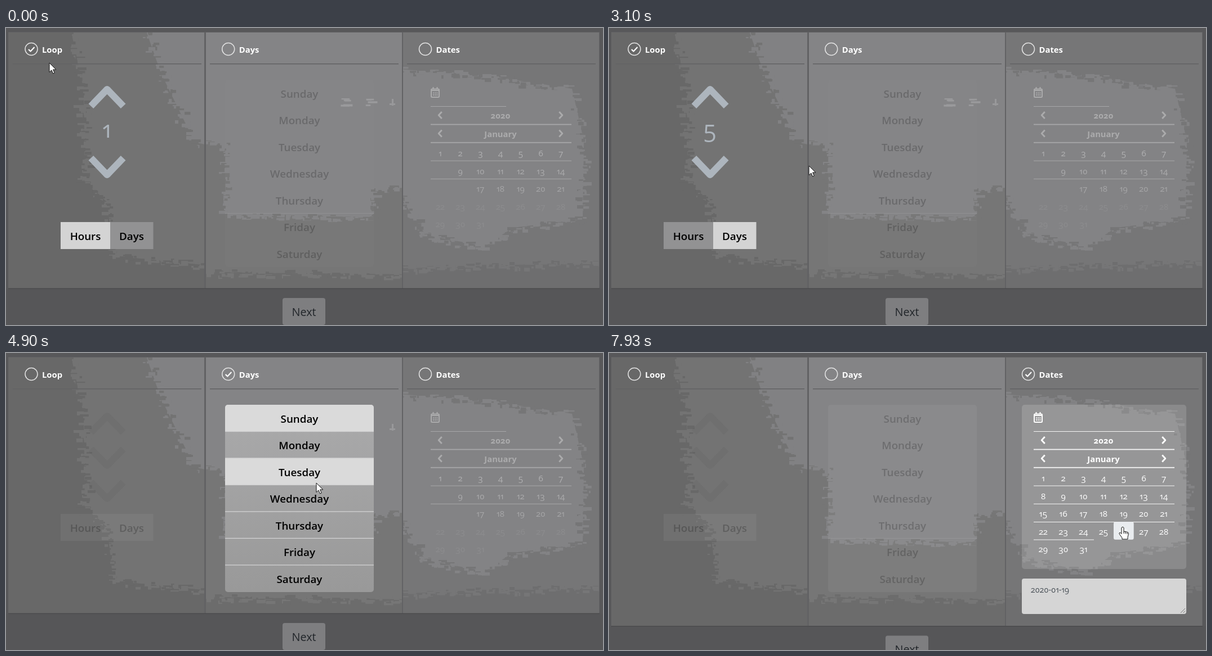
These frames come from a looping animation (1060x528 px, 8 s). An HTML page with a canvas:

```html
<!DOCTYPE html>
<html lang="en">
<head>
<meta charset="utf-8">
<title>Schedule picker</title>
<style>
  html, body { margin: 0; width: 100%; height: 100%; overflow: hidden; background: #565658; }
  canvas, svg { position: absolute; left: 0; top: 0; width: 1060px; height: 528px; }
  svg { font-family: "Open Sans", "Noto Sans", sans-serif; font-variant-numeric: oldstyle-nums; }
  text { text-anchor: middle; }
  polyline { fill: none; stroke-linejoin: round; }
  .left { text-anchor: start; }
</style>
</head>
<body>
<canvas id="back" width="1060" height="528"></canvas>
<svg id="stage" viewBox="0 0 1060 528"></svg>
<script>
const LOOP = 8000;
const TICK = 77.75;   // the screen refreshes once per tick
const LEAD = 16;

// Pointer stops: tick of arrival, x, y, ticks of rest. Every rest ends in a click.
const STOPS = [
  [0, 77, 62, 0], [5, 47, 41, 2], [13, 191, 112, 0], [16, 191, 120, 7],
  [28, 125, 250, 0], [32, 228, 370, 2], [40, 355, 245, 0], [45, 396, 41, 2],
  [54, 581, 116.5, 2], [63, 551, 231, 0], [72, 548, 142, 0], [75, 546, 131.5, 4],
  [85, 741, 40, 3], [96, 912, 286.5, 4], [102, 912, 309, 0]
].map(([at, x, y, rest]) => ({ at, x, y, rest, leave: at + rest }));

const DAYS = ["Sunday", "Monday", "Tuesday", "Wednesday", "Thursday", "Friday", "Saturday"];
const TABS = ["Loop", "Days", "Dates"];

/* ---------- geometry ---------- */
const range = n => [...Array(n).keys()];
const tabX = i => 45 + i * 349.75;
const rowY = i => 92 + i * 47.5;
const cellX = c => 753.2 + c * 35.7;
const cellY = r => 205.5 + r * 31.6;
const within = (p, x, y, w, h) => p.x >= x && p.x < x + w && p.y >= y && p.y < y + h;

const tabAt = p => range(3).findIndex(i => Math.hypot(p.x - tabX(i), p.y - 37.5) < 12);
const rowAt = p => DAYS.findIndex((_, i) => within(p, 389, rowY(i), 264, 47.5));
const dateAt = p => range(31).findIndex(i => within(p, cellX(i % 7), cellY(Math.floor(i / 7)), 35.7, 31.6));
const onUnit = p => within(p, 185, 345, 76.5, 48);

/* ---------- backdrop ---------- */
let seed = 11;
const rnd = () => (seed = (seed * 16807) % 2147483647) / 2147483647;
const ctx = document.getElementById("back").getContext("2d");

function fill(color, x, y, w, h) {
  ctx.fillStyle = color;
  ctx.fillRect(x, y, w, h);
}

// A polygon whose edges break up into short flat dashes
function patch(color, outer, rough, points) {
  ctx.fillStyle = color;
  ctx.beginPath();
  points.forEach(p => ctx.lineTo(p[0], p[1]));
  ctx.fill();
  points.forEach(([x, y], i) => {
    const [u, v] = points[(i + 1) % points.length];
    const n = Math.hypot(u - x, v - y) / 3;
    for (let k = 0; k < n; k++) {
      const off = (rnd() + rnd() - 1) * rough;
      const w = 3 + rnd() * 14, h = 2 + rnd() * 5;
      fill(rnd() < 0.5 ? color : outer,
        Math.round(x + (u - x) * k / n + off - w / 2),
        Math.round(y + (v - y) * k / n + (rnd() - 0.5) * rough), w, h);
    }
  });
}

function panel(x, base, draw) {
  ctx.save();
  ctx.beginPath();
  ctx.rect(x, 8, 348, 478);
  ctx.clip();
  fill(base, x, 8, 348, 478);
  draw();
  ctx.restore();
}

function paintBack() {
  fill("#58585a", 0, 0, 1060, 528);
  fill("#626264", 4, 7, 1050, 479);
  panel(4, "#737373", () => {
    patch("#686868", "#737373", 13, [[-30, -20], [110, -20], [138, 110], [140, 275],
      [180, 310], [190, 405], [390, 425], [390, 520], [-30, 520]]);
    patch("#818183", "#737373", 13, [[240, -20], [275, 80], [335, 203], [390, 215], [390, -20]]);
  });
  panel(355, "#848486", () => {
    patch("#767676", "#848486", 8, [[320, 202], [389, 204], [390, 333], [653, 336],
      [656, 290], [740, 275], [740, 520], [320, 520]]);
    patch("#6c6c6c", "#767676", 12, [[320, 434], [740, 438], [740, 520], [320, 520]]);
  });
  panel(705, "#767677", () => {
    patch("#838385", "#767677", 12, [[680, 72], [850, 84], [1005, 108], [1026, 200],
      [1024, 340], [900, 355], [850, 388], [745, 368], [680, 270]]);
    patch("#6e6e6f", "#767677", 12, [[680, 428], [1090, 415], [1090, 520], [680, 520]]);
  });
  range(3).forEach(i => fill("#626264", 12 + i * 350, 63, 335, 1.5));
}

/* ---------- markup ---------- */
const text = (x, y, size, weight, color, str, more = "") =>
  `<text x="${x}" y="${y}" font-size="${size}" font-weight="${weight}" fill="${color}" ${more}>${str}</text>`;
const rect = (x, y, w, h, color, more = "") =>
  `<rect x="${x}" y="${y}" width="${w}" height="${h}" fill="${color}" ${more}/>`;
const line = (pts, color, width, more = "") =>
  `<polyline points="${pts}" stroke="${color}" stroke-width="${width}" ${more}/>`;
const group = (id, body, more = "") => `<g id="${id}" ${more}>${body}</g>`;

function tab(label, i) {
  const x = tabX(i);
  return `<circle id="ring${i}" cx="${x}" cy="37.5" r="11" fill="none" stroke="#e2e2e2"/>` +
    line(`${x - 5},38 ${x - 1.5},41.5 ${x + 5.5},34`, "#fff", 2.2, `id="check${i}"`) +
    text(x + 19, 43.5, 14.8, 700, "#fff", label, 'class="left"');
}

// Big arrow with its tip at y, opening by d
const arrow = (y, d, color, more) =>
  line(`155,${y + d} 179.5,${y} 204,${y + d}`, color, 12, `stroke-linecap="square" ${more}`);

function loopPanel() {
  const units = y => text(141, y, 18.8, 600, "#000", "Hours") + text(223, y, 18.8, 600, "#000", "Days");
  return group("on0",
    arrow(109, 25.5, "#adb5bd", 'id="up"') + arrow(261, -25.5, "#adb5bd", "") +
    text(179, 195, 42, 400, "#adb5bd", "1", 'id="count"') +
    rect(97, 345, 88, 48, "#929293", 'id="hours"') + rect(185, 345, 76.5, 48, "#929293", 'id="unit"') + units(376.5)) +
    group("off0", rect(97, 286, 164.5, 48, "#fff", 'opacity=".05"') + `<g opacity=".22">${units(317.5)}</g>` +
      [[112, 25], [200, -25], [259, -25]].map(([y, d]) => arrow(y, d, "#000", 'opacity=".04"')).join(""));
}

function daysPanel() {
  const labels = DAYS.map((n, i) => text(521, rowY(i) + 31.5, 18.8, 600, "#000", n)).join("");
  const specks = range(9).map(i =>
    rect(592 + (i % 2) * 45 + rnd() * 10, 125 + rnd() * 12, 4 + rnd() * 14, 2 + rnd() * 2, "#9a9a9c")).join("");
  return `<clipPath id="round"><rect x="389" y="92" width="264" height="333" rx="5"/></clipPath>` +
    group("on1", `<g clip-path="url(#round)">` + rect(389, 92, 264, 333, "url(#list)") +
      DAYS.map((_, i) => rect(389, rowY(i), 264, 47.5, "#dadada", `id="row${i}"`)).join("") +
      range(6).map(i => rect(389, rowY(i + 1) - 0.7, 264, 1.3, "#d2d2d3")).join("") + `</g>` + labels) +
    group("off1", rect(389, 92, 264, 333, "#fff", 'id="haze" rx="5"') +
      rect(389, 329, 264, 1, "#fff", 'opacity=".1"') + group("specks", specks) + `<g opacity=".2">${labels}</g>`) +
    group("mark", rect(681, 134, 10, 3, "#98989a") + rect(685, 126, 3, 12, "#98989a"));
}

function calendar(on) {
  const nav = y => [[771, 2.8], [985, -2.8]].map(([x, d]) =>
    line(`${x + d},${y - 6} ${x - d},${y} ${x + d},${y + 6}`, "#fff", 2.8)).join("");
  const icon = `<rect x="755" y="108.5" width="14" height="14.5" rx="1.5" fill="none" stroke="#fff" stroke-width="2"/>` +
    rect(757.5, 105, 2, 4, "#fff") + rect(764.5, 105, 2, 4, "#fff") + rect(755, 110, 14, 2, "#fff") +
    range(6).map(i => rect(758 + (i % 3) * 3.2, 114.5 + (i > 2 ? 3.5 : 0), 2, 2, "#fff")).join("");
  const rules = range(on ? 6 : 5).map(i => {
    const heavy = i === 1 || i === 2;
    return rect(754, 139 + i * 32.2 - (heavy ? 0.6 : 0), on || i ? 250 : 134, heavy ? 1.8 : 1, "#fff", 'opacity=".9"');
  }).join("");
  const day = i => {
    const r = Math.floor(i / 7), c = i % 7;
    if (!on && r < 3 && c < r) return "";
    return text(cellX(c) + 17.8, cellY(r) + 22.5, 15.2, 400, "#fff", i + 1,
      `opacity="${on ? 1 : r < 3 ? 0.36 - r * 0.04 : 0.07}"`);
  };
  return `<g opacity="${on ? 1 : 0.32}">${icon}${nav(155)}${nav(187.5)}${rules}` +
    text(878, 161, 14.8, 700, "#fff", "2020") + text(878, 193.5, 14.8, 700, "#fff", "January") + `</g>` +
    (on ? rect(754, 331.5, 107, 1, "#fff", 'opacity=".9"') + rect(0, 0, 35.7, 31.5, "#e9ecef", 'id="cell" rx="3"') : "") +
    range(31).map(day).join("");
}

function datesPanel() {
  return group("off2", calendar(false)) + group("on2",
    rect(733, 92, 292, 292, "#fff", 'rx="5" opacity=".15"') + calendar(true) +
    rect(733, 401, 292, 63, "#d5d5d5", 'rx="4"') +
    line("1015,462 1023,454", "#777", 1) + line("1019.5,462 1023,458.5", "#777", 1) +
    text(749, 426, 14.6, 400, "#495057", "2020-01-19", 'id="date" class="left"'));
}

const $ = id => document.getElementById(id);
paintBack();
$("stage").innerHTML =
  `<defs><linearGradient id="list" x2="0" y2="1"><stop stop-color="#aaaaab"/><stop offset="1" stop-color="#999"/></linearGradient></defs>` +
  group("base", rect(0, 463, 1060, 70, "#565658") + rect(4, 462.5, 1050, 1.5, "#4b4b4d") +
    rect(491, 480, 76, 48, "#7e7e80", 'rx="4"') + text(529, 511.5, 19.8, 400, "#212529", "Next")) +
  TABS.map(tab).join("") + loopPanel() + daysPanel() + datesPanel() +
  `<circle id="click" r="12.5" fill="#eeea5e" opacity=".88"/>` +
  group("pointer",
    `<path id="arrow" d="M0 0V16.5L3.9 12.9 6.6 19 9.2 17.9 6.6 11.9H11.8Z"/>` +
    `<path id="hand" d="M-2 1.5Q0-1.2 2 1.5V8L8.5 9.3Q11 10 10.4 13L9 18.5V22H-1V19.5L-6 12.5Q-6.5 9.8-3.8 10.6L-2 12.5ZM2 8V12M5 9V12.5M8 10V13"/>`,
    'fill="#fff" stroke="#111" stroke-linejoin="round"');

/* ---------- motion ---------- */
const show = (id, on) => { $(id).style.display = on ? "" : "none"; };
const set = (id, name, value) => $(id).setAttribute(name, value);

// Speed through a stop: zero where the pointer rests or the path ends
function speed(i, axis) {
  const a = STOPS[i - 1], b = STOPS[i + 1];
  return !a || !b || STOPS[i].rest ? 0 : (b[axis] - a[axis]) / (b.at - a.leave);
}

function pointAt(tick) {
  const j = STOPS.findIndex(s => s.at > tick);
  if (j < 0) return STOPS[STOPS.length - 1];
  const a = STOPS[j - 1], b = STOPS[j];
  if (tick <= a.leave) return a;
  const d = b.at - a.leave, p = (tick - a.leave) / d, e = p * p * (3 - 2 * p);
  const along = axis => a[axis] + (b[axis] - a[axis]) * e +
    d * p * (1 - p) * ((1 - p) * speed(j - 1, axis) - p * speed(j, axis));
  return { x: along("x"), y: along("y") };
}

const countAt = tick => 1 + Math.max(0, Math.min(4, Math.floor((tick - 14) / 1.75)));

function render(ms) {
  const tick = Math.floor((ms % LOOP + LEAD) / TICK);
  const p = pointAt(tick);
  const clicks = STOPS.filter(s => s.rest && tick > s.leave);
  const mode = clicks.reduce((m, s) => tabAt(s) < 0 ? m : tabAt(s), 0);

  TABS.forEach((_, i) => {
    show("on" + i, mode === i);
    show("off" + i, mode !== i);
    show("check" + i, mode === i);
    set("ring" + i, "stroke-width", tabAt(p) === i ? 2.2 : 1.5);
  });
  set("base", "transform", `translate(0 ${mode === 2 ? 22.5 : 0})`);
  set("haze", "opacity", mode === 2 ? 0.05 : 0.01);
  show("specks", mode === 0);
  show("mark", mode < 2);

  const overUp = mode === 0 && within(p, 148, 102, 63, 40);
  set("up", "stroke", overUp ? "#495057" : "#adb5bd");
  $("count").textContent = countAt(tick);

  const daily = clicks.some(onUnit);
  set("hours", "fill", daily ? "#929293" : "#d4d4d4");
  set("unit", "fill", daily || onUnit(p) ? "#d4d4d4" : "#929293");

  DAYS.forEach((_, i) => {
    const picked = clicks.filter(s => rowAt(s) === i).length % 2;
    show("row" + i, picked || rowAt(p) === i);
  });

  const date = mode === 2 ? dateAt(p) : -1;
  show("cell", date >= 0);
  set("cell", "x", cellX(date % 7));
  set("cell", "y", cellY(Math.floor(date / 7)));
  show("date", clicks.some(s => dateAt(s) >= 0));

  const resting = STOPS.some(s => s.rest && tick >= s.leave - 2 && tick < s.leave);
  show("click", resting || countAt(tick) !== countAt(tick - 1));
  const hand = tabAt(p) >= 0 || overUp || date >= 0;
  show("hand", hand);
  show("arrow", !hand);
  const place = `translate(${p.x} ${p.y})`;
  set("click", "transform", place);
  set("pointer", "transform", place);
}

const start = performance.now();
function play() {
  render(performance.now() - start);
  requestAnimationFrame(play);
}
play();
</script>
</body>
</html>
```
